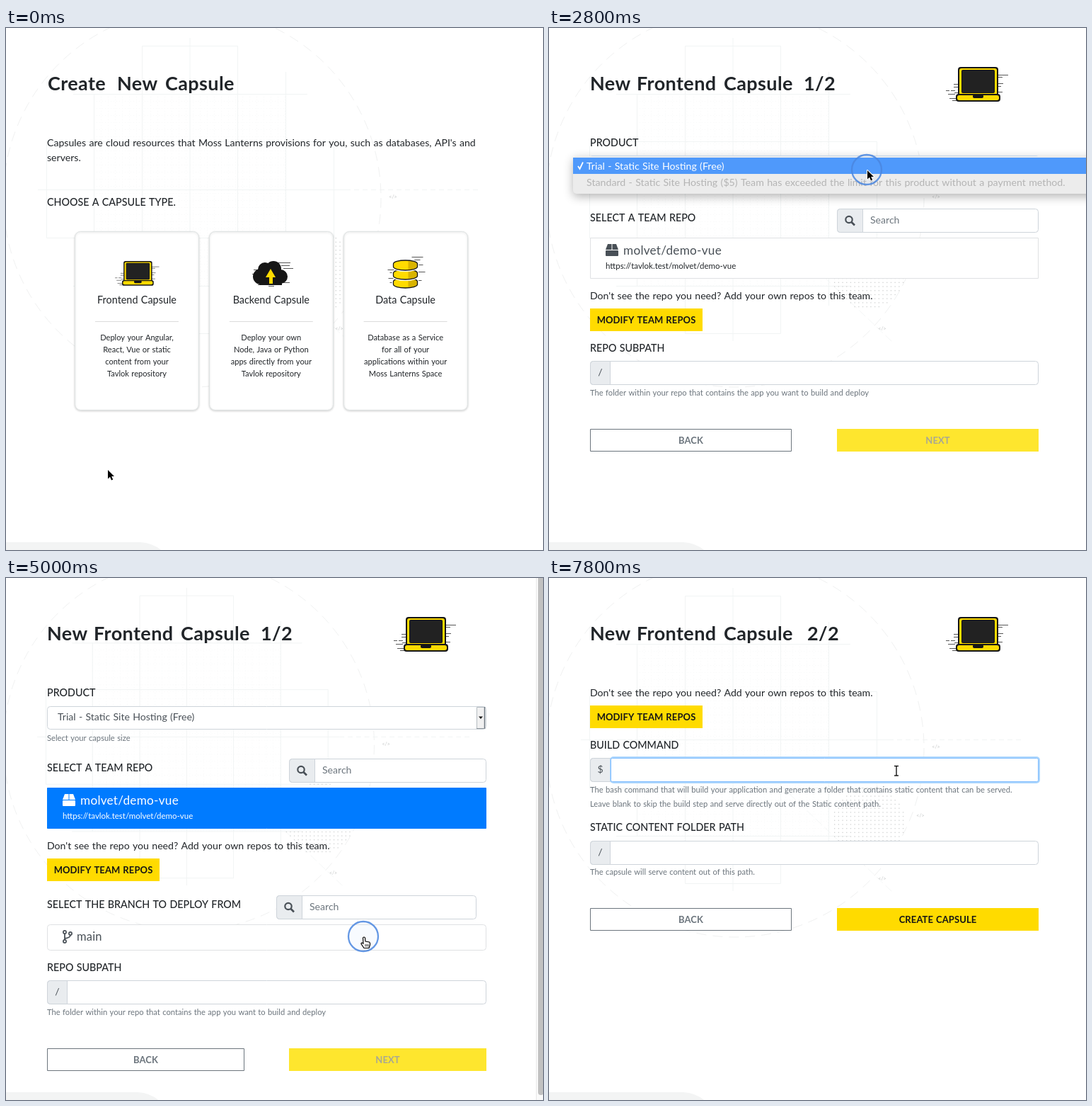
Write an HTML page with a canvas that moves like this. It is 759 by 737 pixels and loops after 8000 ms.

```html
<!DOCTYPE html>
<html lang="en">
<head>
<meta charset="utf-8">
<title>Create New Capsule</title>
<style>
html, body { margin: 0; width: 100%; height: 100%; overflow: hidden; background: #fff; }
canvas { display: block; }
</style>
</head>
<body>
<canvas id="stage" width="759" height="737"></canvas>
<script>
const ctx = document.getElementById('stage').getContext('2d');
const LOOP = 8000, STEP = 200, LEFT = 58;
const INK = '#212529', MUTED = '#6c757d', SLATE = '#495057', LINE = '#ced4da',
      PALE = '#e9ecef', YELLOW = '#ffdb00', BLUE = '#007bff', BLACK = '#161616';

// Moments at which the interface changes
const FORM = 800, REPOS = 1600, PRODUCTS = 2400, MENU = 2800, MENU_END = 3600,
      REPO_ON = 4400, BRANCHES = 4600, BRANCH_ON = 5200, NEXT_HOVER = 5600,
      BUILD = 6000, FOCUS = 7400;

// Pointer stops: time, x, y
const STOPS = [[0, 143, 623], [500, 166, 353], [1200, 166, 353], [2000, 393, 239],
  [2600, 449, 200], [3400, 449, 200], [4000, 447, 339], [4400, 447, 339],
  [4900, 505, 506], [5100, 505, 506], [5600, 541, 677], [6000, 541, 677],
  [7000, 490, 271], [LOOP, 490, 271]];
const CLICKS = [600, 2800, 3400, 4150, 5000, 5600];

let width = 633; // content width, narrower while the scrollbar shows

function text(str, x, y, { size = 14.1, color = INK, weight = 400, align = 'left', spacing = 0 } = {}) {
  ctx.font = `${weight} ${size}px Lato, "Open Sans", sans-serif`;
  ctx.letterSpacing = spacing + 'px';
  ctx.wordSpacing = size * 0.05 + 'px';
  ctx.textAlign = align;
  ctx.fillStyle = color;
  ctx.fillText(str, x, y);
}
const label = (str, y) => text(str, LEFT, y, { size: 14.3, weight: 500 });
const help = (str, y) => text(str, LEFT, y, { size: 11.2, color: MUTED });

function heading(words) {
  for (const [word, x] of words) text(word, x, 88, { size: 27, weight: 700, spacing: 0.4 });
}

// Outlined boxes sit on half pixels, plain fills on whole ones
function box(x, y, w, h, fill, stroke, r = 0) {
  const inset = stroke ? 0.5 : 0;
  ctx.beginPath();
  ctx.roundRect(x + inset, y + inset, w - 2 * inset, h - 2 * inset, r);
  if (fill) { ctx.fillStyle = fill; ctx.fill(); }
  if (stroke) { ctx.strokeStyle = stroke; ctx.lineWidth = 1; ctx.stroke(); }
}

function shadowed(color, blur, offset, draw) {
  ctx.save();
  Object.assign(ctx, { shadowColor: color, shadowBlur: blur, shadowOffsetY: offset });
  draw();
  ctx.restore();
}

function line(x1, y1, x2, y2, color, w = 1, dash = []) {
  ctx.beginPath();
  ctx.setLineDash(dash);
  ctx.moveTo(x1, y1);
  ctx.lineTo(x2, y2);
  ctx.strokeStyle = color;
  ctx.lineWidth = w;
  ctx.stroke();
  ctx.setLineDash([]);
}

function circle(x, y, r, stroke, w, fill) {
  ctx.beginPath();
  ctx.arc(x, y, r, 0, Math.PI * 2);
  if (fill) { ctx.fillStyle = fill; ctx.fill(); }
  if (stroke) { ctx.strokeStyle = stroke; ctx.lineWidth = w; ctx.stroke(); }
}

function shape(points, fill, stroke, w = 1) {
  ctx.beginPath();
  points.forEach(([x, y]) => ctx.lineTo(x, y));
  ctx.closePath();
  if (stroke) { ctx.strokeStyle = stroke; ctx.lineWidth = w; ctx.lineJoin = 'round'; ctx.stroke(); }
  ctx.fillStyle = fill;
  ctx.fill();
}

function at(x, y, scale, draw) {
  ctx.save();
  ctx.translate(x, y);
  ctx.scale(scale, scale);
  draw();
  ctx.restore();
}

// Speed lines: x, y, length
const dashes = list => list.forEach(([x, y, len]) => line(x, y + 0.5, x + len, y + 0.5, '#444', 0.9));

function background(scrolled) {
  const k = scrolled ? 0.982 : 1, faint = '#f1f4f4';
  at(0, 0, k, () => {
    ctx.setLineDash([14, 9]);
    circle(263, 240, 267, '#f0f1f1', 1);
    ctx.setLineDash([]);
    for (let i = 0; i <= 27; i++) {
      const d = i * 10;
      line(124.5 + d, 93, 124.5 + d, 364, '#f8f9f9', 1, [1, 3]);
      line(124, 93.5 + d, 395, 93.5 + d, '#f8f9f9', 1, [1, 3]);
    }
    box(192, 25, 136, 407, null, faint);
    box(57, 160, 407, 137, null, faint);
    line(260, 14, 260, 442, faint);
    line(124.5, 93, 124.5, 364, faint);
    line(395.5, 62, 395.5, 392, faint);
    line(95, 93.5, 426, 93.5, faint);
    line(95, 364.5, 426, 364.5, faint);
    line(45, 228.5, 480, 228.5, faint);
    line(480, 228.5, 670, 228.5, faint, 1, [7, 5]);
    line(340, 305, 485, 443, '#f5f7f7', 1, [12, 5]);
    for (let x = -48; x <= 50; x += 5.7)
      for (let y = -49; y <= 50; y += 5.7)
        if (Math.hypot(x, y) < 52) {
          ctx.fillStyle = '#cfd1d1';
          ctx.fillRect(451 + x, 345 + y, 1.3, 1.3);
        }
    for (const [x, y] of [[547, 241], [471, 427], [525, 338]])
      text('</>', x, y, { size: 7, color: '#c4c7c7', align: 'center' });
  });
  ctx.beginPath();
  ctx.moveTo(0, 726);
  ctx.lineTo(190 * k, 726);
  ctx.quadraticCurveTo(207 * k, 727, 219 * k, 737);
  ctx.lineTo(0, 737);
  ctx.fillStyle = '#f3f4f4';
  ctx.fill();
}

function laptop(x, y, scale) {
  at(x, y, scale, () => {
    dashes([[28, -13, 15], [28, -10, 7], [28, -1, 8], [28, 3, 5], [28, 11, 7],
      [-34, 0, 6], [-34, 4, 6], [-38, 9, 6], [-45, 9, 5], [-42, 14, 10], [-33, 12, 5], [-40, 20, 9], [-36, 23, 6]]);
    box(-28, -24, 57, 41, BLACK, null, 4);
    box(-26, -22, 53, 38, YELLOW, null, 3);
    box(-23, -20, 47, 33, BLACK, null, 2);
    box(-22, -19, 45, 31, '#222', null, 1);
    box(-31, 14, 63, 11, BLACK, null, 4);
    box(-29, 16, 59, 7, YELLOW, null, 3);
    box(-7, 15, 15, 5, BLACK, null, 2);
  });
}

function cloud(x, y) {
  at(x, y, 1, () => {
    dashes([[10, -15, 18], [15, -11, 12], [18, -7, 14], [-24, -5, 8], [-26, 1, 9], [12, 13, 15], [-18, 16, 10], [-3, 18, 8]]);
    for (const [cx, cy, r] of [[-14, 5, 11], [-8, -5, 10], [4, -6, 11], [14, 5, 10]])
      circle(cx, cy, r, null, 0, BLACK);
    box(-16, 4, 32, 13, BLACK);
    shape([[0, -6], [7, 6], [3, 6], [3, 15], [-2, 15], [-2, 6], [-7, 6]], YELLOW);
  });
}

function database(x, y) {
  at(x, y, 1, () => {
    dashes([[9, -24, 16], [12, -20, 9], [16, -13, 9], [-25, -6, 9], [-22, -2, 7], [17, -3, 11],
      [-24, 6, 8], [18, 9, 5], [-22, 12, 7], [-15, 18, 8]]);
    for (const cy of [11, -1, -14]) {
      const slab = () => {
        ctx.beginPath();
        ctx.ellipse(0, cy, 17, 5, 0, Math.PI, 0);
        ctx.lineTo(17, cy + 4);
        ctx.ellipse(0, cy + 4, 17, 5, 0, 0, Math.PI);
        ctx.closePath();
      };
      slab();
      ctx.lineWidth = 4;
      ctx.strokeStyle = '#fff';
      ctx.stroke();
      ctx.fillStyle = YELLOW;
      ctx.fill();
      ctx.save();
      ctx.clip();
      ctx.fillStyle = '#d9b400';
      ctx.fillRect(4, cy - 6, 14, 16);
      ctx.restore();
      slab();
      ctx.lineWidth = 1.3;
      ctx.strokeStyle = BLACK;
      ctx.stroke();
    }
  });
}

function button(str, x, y, w, { fill, stroke, color = BLACK } = {}) {
  box(x, y, w, 32, fill, stroke);
  text(str, x + w / 2, y + 20.5, { size: 13, weight: 700, color, align: 'center', spacing: 0.1 });
}

const column = () => Math.round(LEFT + width * 0.5513);

function buttonRow(y, str, style) {
  const w = Math.round(width * 0.45);
  button('BACK', LEFT, y, w, { fill: '#fff', stroke: MUTED, color: MUTED });
  button(str, column(), y, w, style);
}

function search(x, y, w) {
  box(x, y, w, 34, '#fff', LINE, 4);
  box(x, y, 37, 34, PALE, LINE, [4, 0, 0, 4]);
  circle(x + 17, y + 15.5, 4.7, SLATE, 2.2);
  line(x + 20.5, y + 19, x + 25, y + 23.5, SLATE, 2.6);
  text('Search', x + 47, y + 21, { color: MUTED });
}

function input(y, prefix, focused) {
  box(LEFT, y, width + 1, 34, '#fff', LINE, 4);
  box(LEFT, y, 29, 34, PALE, LINE, [4, 0, 0, 4]);
  text(prefix, 72.5, y + 21, { color: SLATE, align: 'center' });
  if (focused) {
    box(86, y - 2, width - 25, 38, '#acd6fd', null, 5);
    box(87, y, width - 28, 34, '#fff', '#80bdff', 2);
  }
}

function teamRepos(y) {
  text("Don't see the repo you need? Add your own repos to this team.", LEFT, y);
  button('MODIFY TEAM REPOS', LEFT, y + 13, 159, { fill: YELLOW });
}

function chooser() {
  heading([['Create', 59], ['New', 157], ['Capsule', 225]]);
  text("Capsules are cloud resources that Moss Lanterns provisions for you, such as databases, API's and", LEFT, 167);
  text('servers.', LEFT, 188);
  label('CHOOSE A CAPSULE TYPE.', 251);
  const cards = [
    ['Frontend', 'Deploy your Angular,', 'React, Vue or static', 'content from your', 'Tavlok repository'],
    ['Backend', 'Deploy your own', 'Node, Java or Python', 'apps directly from your', 'Tavlok repository'],
    ['Data', 'Database as a Service', 'for all of your', 'applications within your', 'Moss Lanterns Space']];
  cards.forEach(([name, ...lines], i) => {
    const mid = 185 + i * 189.8;
    shadowed('rgba(0,0,0,.16)', 3, 1, () => box(Math.round(mid - 88), 287, 176, 253, '#fff', '#dfe3e3', 8));
    text(name + ' Capsule', mid, 389, { size: 14.4, align: 'center' });
    line(mid - 59, 414.5, mid + 59, 414.5, '#dcdcdc');
    lines.forEach((str, n) => text(str, mid, 441 + n * 16.9, { size: 11.1, align: 'center' }));
  });
  laptop(186, 346, 0.71);
  cloud(374, 346);
  database(564.5, 347);
}

function spinner(t) {
  const s = (t - 1000) / 1000, rad = Math.PI / 180;
  const start = 240 + 351 * s, sweep = 170 + 108 * Math.cos(2 * Math.PI * s / 1.333);
  ctx.beginPath();
  ctx.arc(102.5, 224.5, 31, start * rad, (start + sweep) * rad);
  ctx.strokeStyle = YELLOW;
  ctx.lineWidth = 8;
  ctx.stroke();
}

function productSelect(focused) {
  const right = LEFT + width;
  if (focused) box(LEFT - 1, 180, width + 3, 35, '#d5e9ff', null, 5);
  box(LEFT, 181, width + 1, 33, '#fff', focused ? '#9ccbf5' : LINE, 4);
  text('Trial - Static Site Hosting (Free)', 73, 201, { color: SLATE });
  box(right - 13, 182, 12, 31, '#f1f1f1', '#b5bcc2');
  line(right - 1.5, 182, right - 1.5, 213, '#6d7780', 1.5);
  line(right - 13, 212.5, right - 1, 212.5, '#8b949b');
  shape([[right - 10, 195.5], [right - 4, 195.5], [right - 7, 199]], BLACK);
}

function productMenu() {
  shadowed('rgba(0,0,0,.3)', 14, 4, () => box(34, 181, 760, 53, '#ececec', null, 5));
  ctx.fillStyle = '#4f99fb';
  ctx.fillRect(34, 183, 725, 23);
  ctx.beginPath();
  ctx.moveTo(41, 195);
  ctx.lineTo(43.5, 199);
  ctx.lineTo(48, 189.5);
  ctx.strokeStyle = '#fff';
  ctx.lineWidth = 1.8;
  ctx.stroke();
  text('Trial - Static Site Hosting (Free)', 53, 200, { size: 14.2, color: '#fff' });
  text('Standard - Static Site Hosting ($5) Team has exceeded the limit for this product without a payment method.',
    53, 222.5, { size: 14.2, color: '#b4b4b4' });
}

function repoItem(y, hovered, selected) {
  const color = selected ? '#fff' : hovered ? INK : SLATE;
  box(LEFT, y, width + 1, 58, selected ? BLUE : hovered ? PALE : '#fff', selected ? BLUE : '#dfe1e3');
  shape([[83, y + 9], [88.5, y + 9], [88.5, y + 17], [80, y + 17]], color);
  shape([[95, y + 9], [89.5, y + 9], [89.5, y + 17], [98, y + 17]], color);
  box(80, y + 18, 18, 8, color, null, 1);
  text('molvet/demo-vue', 105, y + 24, { size: 17.2, color, spacing: 0.25 });
  text('https://tavlok.test/molvet/demo-vue', 80, y + 43.5, { size: 11.5, color: selected ? '#fff' : INK });
}

function branchList(selected) {
  const color = selected ? '#fff' : SLATE;
  label('SELECT THE BRANCH TO DEPLOY FROM', 466);
  search(382, 448, 283);
  box(LEFT, 489, width + 1, 37, selected ? BLUE : '#fff', selected ? BLUE : '#dfe1e3', 4);
  for (const [x, y] of [[83, 500], [83, 513], [91, 502]]) circle(x, y, 2.1, color, 1.7);
  line(83, 502, 83, 511, color, 1.8);
  ctx.beginPath();
  ctx.moveTo(91, 504);
  ctx.quadraticCurveTo(91, 508, 83, 509);
  ctx.stroke();
  text('main', 100, 512, { size: 16.5, color, spacing: 0.2 });
}

function form(t) {
  heading([['New', 58], ['Frontend', 124], ['Capsule', 247], ['1/2', 360]]);
  laptop(LEFT + width - 85, 79, 1);
  label('PRODUCT', 167);
  const loaded = t >= PRODUCTS, shift = loaded ? -54 : 0;
  if (loaded) productSelect(t >= MENU && t < REPO_ON);
  else spinner(t);
  help('Select your capsule size', loaded ? 229.5 : 284);

  label('SELECT A TEAM REPO', 327 + shift);
  search(column(), 310 + shift - (loaded ? 1 : 0), Math.round(width * 0.45));
  let y = 381 + shift;
  if (t >= REPOS) {
    repoItem(350 + shift, t >= 3800, t >= REPO_ON);
    y += 56;
  } else line(LEFT, 351, LEFT + width, 351, '#cfd1d2', 1.5);
  teamRepos(y);
  if (t >= BRANCHES) {
    branchList(t >= BRANCH_ON);
    y += 98;
  }
  label('REPO SUBPATH', y + 73.5);
  input(y + 87, '/');
  help('The folder within your repo that contains the app you want to build and deploy', y + 135.5);

  const hovered = t >= NEXT_HOVER;
  if (hovered) box(column() - 2, y + 181, Math.round(width * 0.45) + 4, 36, '#ffe95c', null, 2);
  buttonRow(y + 183, 'NEXT', hovered ? { fill: '#dfbe00', color: '#fff' }
    : t >= BRANCH_ON ? { fill: YELLOW } : { fill: '#fee62e', color: '#a8a894' });
  if (t >= MENU && t < MENU_END) productMenu();
}

function buildForm(t) {
  heading([['New', 58], ['Frontend', 124], ['Capsule', 247], ['2/2', 365]]);
  laptop(606, 79, 1);
  teamRepos(167);
  label('BUILD COMMAND', 240.5);
  input(254, '$', t >= FOCUS);
  help('The bash command that will build your application and generate a folder that contains static content that can be served.', 303);
  help('Leave blank to skip the build step and serve directly out of the Static content path.', 323);
  label('STATIC CONTENT FOLDER PATH', 357);
  input(371, '/');
  help('The capsule will serve content out of this path.', 419);
  buttonRow(466, 'CREATE CAPSULE', { fill: YELLOW });
}

function scrollbar() {
  ctx.fillStyle = '#fafafa';
  ctx.fillRect(749, 0, 10, 737);
  line(749.5, 0, 749.5, 737, '#e8e8e8');
  box(752, -10, 8, 740, '#c1c1c1', null, 4);
}

function pointerAt(t) {
  const i = STOPS.findIndex(stop => stop[0] > t);
  const [t0, x0, y0] = STOPS[i - 1], [t1, x1, y1] = STOPS[i];
  const u = (t - t0) / (t1 - t0), e = u * u * (3 - 2 * u);
  return [x0 + (x1 - x0) * e, y0 + (y1 - y0) * e];
}

function hand() {
  ctx.beginPath();
  ctx.moveTo(-1.5, 1);
  ctx.quadraticCurveTo(0, -1, 1.5, 1);
  ctx.lineTo(2, 6);
  ctx.lineTo(7.5, 7);
  ctx.quadraticCurveTo(9, 8, 8.5, 11);
  ctx.lineTo(7, 15.5);
  ctx.lineTo(0, 15.5);
  ctx.lineTo(-4, 9.5);
  ctx.quadraticCurveTo(-4, 7, -1, 9);
  ctx.closePath();
  ctx.fillStyle = '#fff';
  ctx.fill();
  ctx.strokeStyle = '#000';
  ctx.lineWidth = 1.2;
  ctx.stroke();
  for (const x of [2, 4, 6]) line(x, 10, x, 13.5, '#000', 0.8);
}

function beam() {
  for (const [w, color] of [[3, '#fff'], [1.3, '#000']]) {
    line(0, -6, 0, 7, color, w);
    line(-3, -6.5, 3, -6.5, color, w);
    line(-3, 7, 3, 7, color, w);
  }
}

function arrow() {
  shape([[0, 0], [0, 12.5], [3, 9.8], [5, 14.5], [7.2, 13.5], [5.2, 9], [9, 9]], '#000', '#fff', 2);
}

function pointer(t) {
  const [x, y] = pointerAt(t);
  const click = CLICKS.find(c => t >= c && t < c + 300);
  if (click !== undefined) {
    const age = (t - click) / STEP;
    ctx.globalAlpha = 0.85 - 0.55 * age;
    circle(x, y, 21 - 5 * age, '#4a86e0', 2.3, 'rgba(120,170,240,.06)');
    ctx.globalAlpha = 1;
  }
  const onCard = t < FORM && y < 540;
  const onItem = t >= 3800 && t < BUILD && ((y > 296 && y < 353) || (y > 489 && y < 526) || y > 664);
  at(x + 1, y + 1, 1, t >= BUILD && y < 288 ? beam : onCard || onItem ? hand : arrow);
}

function render(t) {
  const scrolled = t >= BRANCHES && t < BUILD;
  width = scrolled ? 620 : 633;
  ctx.fillStyle = '#fff';
  ctx.fillRect(0, 0, 759, 737);
  background(scrolled);
  if (t < FORM) chooser();
  else if (t < BUILD) form(t);
  else buildForm(t);
  if (scrolled) scrollbar();
  pointer(t);
}

function tick() {
  render(Math.floor(performance.now() % LOOP / STEP) * STEP);
  requestAnimationFrame(tick);
}
tick();
</script>
</body>
</html>
```
